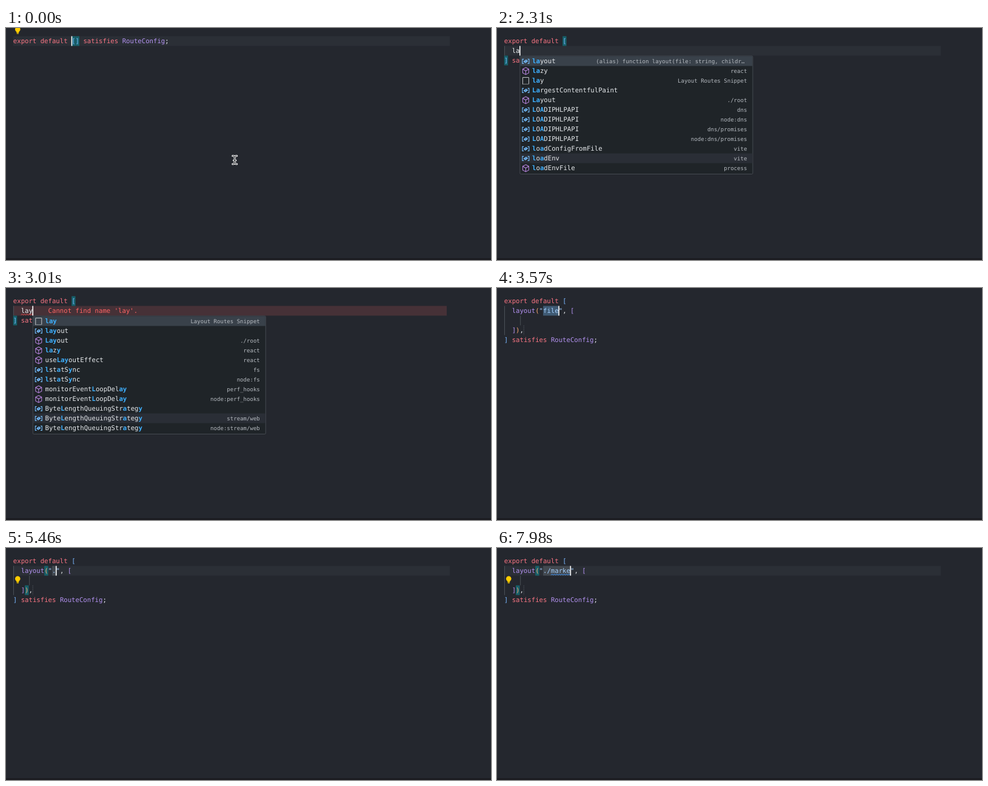
An HTML page that plays this animation: 800 by 382 pixels, repeating every 8 s.

```html
<!DOCTYPE html>
<html lang="en">
<head>
<meta charset="utf-8">
<title>Code editor</title>
<style>
  html, body { margin: 0; width: 100%; height: 100%; overflow: hidden; background: #24272e; }
  svg { display: block; width: 800px; height: 382px; }
  text {
    font: 10.67px "DejaVu Sans Mono", "Liberation Mono", monospace;
    white-space: pre;
    text-rendering: geometricPrecision;
    font-variant-ligatures: none;
  }
  .detail { font-size: 9.05px; fill: #b4b9bf; text-anchor: end; }
  .label { fill: #e6e9ec; }
  .hit { fill: #3eb0ff; font-weight: bold; }
</style>
</head>
<body>
<svg id="stage" viewBox="0 0 800 382"></svg>
<script>
const LOOP = 8000, LEFT = 11.8, TOP = 13.5, CHAR = 6.424, LINE = 16;
const RED = '#f97583', PURPLE = '#b392f0', BLUE = '#79b8ff', ORANGE = '#ffab70',
      STRING = '#a5d0ff', PLAIN = '#eceff2';

const colX = col => LEFT + col * CHAR;
const lineY = line => TOP + line * LINE;
const escapeText = s => s.replace(/&/g, '&amp;').replace(/</g, '&lt;');
const rect = (x, y, w, h, fill, extra = '') =>
  `<rect x="${x}" y="${y}" width="${w}" height="${h}" fill="${fill}" ${extra}/>`;
const cells = (line, col, count, fill) => rect(colX(col), lineY(line), count * CHAR, LINE, fill);
const path = (d, stroke, width = 1, extra = '') =>
  `<path d="${d}" fill="none" stroke="${stroke}" stroke-width="${width}" ${extra}/>`;

function codeLine(tokens, line) {
  let col = 0;
  return tokens.map(([color, s]) => {
    const out = `<text x="${colX(col)}" y="${lineY(line) + 11.5}" fill="${color}">${escapeText(s)}</text>`;
    col += s.length;
    return out;
  }).join('');
}

const opening = [RED, 'export default '];
const ending = [[RED, ' satisfies '], [PURPLE, 'RouteConfig'], [PLAIN, ';']];
const collapsed = () => [[opening, [BLUE, '[]'], ...ending]];
const expanded = word => [[opening, [BLUE, '[']], [[PLAIN, '  ' + word]], [[BLUE, ']'], ...ending]];
const nested = file => [
  [opening, [BLUE, '[']],
  [[PURPLE, '  layout'], [ORANGE, '('], [STRING, `"${file}"`], [PLAIN, ', '], [PURPLE, '[']],
  [],
  [[PURPLE, '  ]'], [ORANGE, ')'], [PLAIN, ',']],
  [[BLUE, ']'], ...ending]
];

const icons = {
  v: path('M2.8 1.5H.5V8.5H2.8M9.2 1.5H11.5V8.5H9.2', '#75beff', 1.1) +
     path('M3 5.2 6.6 2.6 9 4.6 5.4 7.4ZM3 5.2 5.6 5.2 9 4.6', '#75beff', 1.1),
  f: path('M6 -.8 11 1.8V8L6 10.8 1 8V1.8ZM1 1.8 6 4.6 11 1.8M6 4.6V10.8', '#b180d7', 1.1),
  s: path('M1 10.5V-.5H11V10.5', '#c5c9cd') + path('M1 10.5H11', '#c5c9cd', 1, 'stroke-dasharray="1.5 1"')
};

// Rows: icon | label with *matched* parts | detail
const popups = {
  la: {
    col: 4,
    rows: `v|*la*yout|(alias) function layout(file: string, childr…
f|*la*zy|react
s|*la*y|Layout Routes Snippet
v|*La*rgestContentfulPaint|
f|*La*yout|./root
v|*L*O*A*DIPHLPAPI|dns
v|*L*O*A*DIPHLPAPI|node:dns
v|*L*O*A*DIPHLPAPI|dns/promises
v|*L*O*A*DIPHLPAPI|node:dns/promises
v|*l*o*a*dConfigFromFile|vite
v|*l*o*a*dEnv|vite
f|*l*o*a*dEnvFile|process`
  },
  lay: {
    col: 5,
    rows: `s|*lay*|Layout Routes Snippet
v|*lay*out|
f|*Lay*out|./root
f|*la*z*y*|react
f|use*Lay*outEffect|react
v|*l*st*a*tS*y*nc|fs
v|*l*st*a*tS*y*nc|node:fs
f|monitorEvent*L*oopDel*ay*|perf_hooks
f|monitorEvent*L*oopDel*ay*|node:perf_hooks
v|Byte*L*engthQueuingStr*a*teg*y*|
v|Byte*L*engthQueuingStr*a*teg*y*|stream/web
v|Byte*L*engthQueuingStr*a*teg*y*|node:stream/web`
  }
};

function drawPopup({ col, rows }) {
  const x = colX(col) + .4, y = 46;
  let out = rect(x, y, 384, 194.5, '#1f2428', 'stroke="#454a51" rx="1.5"');
  rows.split('\n').forEach((row, i) => {
    const [icon, label, detail] = row.split('|');
    const top = y + .5 + i * LINE;
    if (i === 0) out += rect(x + .5, top, 383, LINE, '#39414a');
    if (i === 10) out += rect(x + .5, top, 383, LINE, '#2a2e36');
    const spans = label.split('*').map((part, k) =>
      `<tspan${k % 2 ? ' class="hit"' : ''}>${part}</tspan>`).join('');
    const right = x + (detail.endsWith('…') ? 370.5 : 374.5);
    out += `<g transform="translate(${x + 3.5} ${top + 3.4})">${icons[icon]}</g>` +
      `<text class="label" x="${x + 20.2}" y="${top + 11.5}">${spans}</text>` +
      `<text class="detail" x="${right}" y="${top + 11.2}">${detail}</text>`;
  });
  return out;
}

function squiggle(from, to, color) {
  let d = `M${colX(from)} 44.6`;
  for (let x = colX(from), up = true; x < colX(to) - 1; x += 2, up = !up) d += `l2 ${up ? -1.8 : 1.8}`;
  return path(d, color);
}

const drawBulb = y =>
  `<g transform="translate(19.3 ${y})"><circle r="4.3" fill="#ffcc00"/>` +
  rect(-2, 2.5, 4, 3.2, '#ffcc00') + rect(-1.6, 6.2, 3.2, 1.3, '#ffcc00') + '</g>';

function drawPointer() {
  const d = 'M373.8 210.5Q377 210.5 377.3 212.5Q377.6 210.5 380.8 210.5M377.3 212V222.5' +
            'M373.8 224Q377 224 377.3 222Q377.6 224 380.8 224M375.5 218H379';
  return path(d, '#f4f4f4', 3, 'stroke-linecap="round"') + path(d, '#17191d', 1);
}

const guide = (x, from, to, extra) => path(`M${x} ${from}V${to}`, '#4b5057', 1, extra);

const typed = (file, extra) => ({
  code: nested(file), cursor: [1, 10 + file.length], on: true, active: 1,
  match: [[1, 8], [3, 3]], selection: null, placeholder: file.length, bulb: null, ...extra
});

// Each step changes part of the editor state and keeps the rest.
const steps = [
  [0, { code: collapsed(), cursor: [0, 15], on: true, active: 0, match: [[0, 15], [0, 16]],
        bulb: 2.2, pointer: true }],
  [420, { on: false }],
  [910, { on: true, pointer: false }],
  [1050, { code: expanded(''), cursor: [1, 2], active: 1, match: [[0, 15], [2, 0]], bulb: null }],
  [1820, { on: false }],
  [2170, { code: expanded('l'), cursor: [1, 3], on: true }],
  [2240, { code: expanded('la'), cursor: [1, 4] }],
  [2310, { popup: 'la' }],
  [2590, { code: expanded('lay'), cursor: [1, 5] }],
  [2660, { popup: 'lay' }],
  [2940, { error: true }],
  [3150, { on: false }],
  [3570, { code: nested('file'), cursor: [1, 14], on: true, active: null, match: [],
           selection: 4, popup: null, error: false }],
  [4130, { on: false }],
  [4620, { on: true }],
  [5110, { on: false }],
  [5320, typed('.')],
  [5460, { bulb: 50.6 }],
  [6020, typed('./')],
  [6160, typed('./m')],
  [6300, typed('./ma')],
  [6440, typed('./mar')],
  [7000, { on: false }],
  [7140, typed('./mark')],
  [7420, typed('./marke')],
  [7910, { bulb: 50.6, spelling: true }]
];

let state = {};
const scenes = steps.map(([time, change]) => ({ time, state: state = { ...state, ...change } }));

function draw(s) {
  const lines = s.code.length;
  let out = rect(0, 0, 800, 382, '#24272e') + rect(0, 379, 800, 3, '#1b1c21');
  if (s.active !== null)
    out += rect(LEFT, lineY(s.active), (s.error ? 727 : 732) - LEFT, LINE, s.error ? '#463137' : '#2b2f36');
  if (lines > 1) out += guide(12.5, lineY(1), lineY(lines - 1));
  if (lines === 5) {
    out += guide(38.7, lineY(2), lineY(3)) + guide(44.2, lineY(3), lineY(4), 'stroke-dasharray="2 1"');
  }
  if (s.selection) out += cells(1, 10, s.selection, '#3f5a73');
  if (s.placeholder) out += cells(1, 10, s.placeholder, '#434950');
  out += s.match.map(([line, col]) => cells(line, col, 1, '#17606a')).join('');
  out += s.code.map(codeLine).join('');
  if (s.error) {
    out += squiggle(2, 5, '#f14c4c') +
      `<text x="${colX(9)}" y="${lineY(1) + 11.5}" fill="#ff6464">Cannot find name 'lay'.</text>`;
  }
  if (s.spelling) out += squiggle(12, 17, '#3794ff');
  if (s.bulb !== null) out += drawBulb(s.bulb);
  if (s.on) out += rect(colX(s.cursor[1]) - .5, lineY(s.cursor[0]), 1.6, LINE, '#fff');
  if (s.popup) out += drawPopup(popups[s.popup]);
  if (s.pointer) out += drawPointer();
  return out;
}

const stage = document.getElementById('stage');
let shown = -1;
function tick() {
  const time = performance.now() % LOOP;
  const index = scenes.findLastIndex(scene => scene.time <= time);
  if (index !== shown) stage.innerHTML = draw(scenes[shown = index].state);
  requestAnimationFrame(tick);
}
tick();
</script>
</body>
</html>
```
